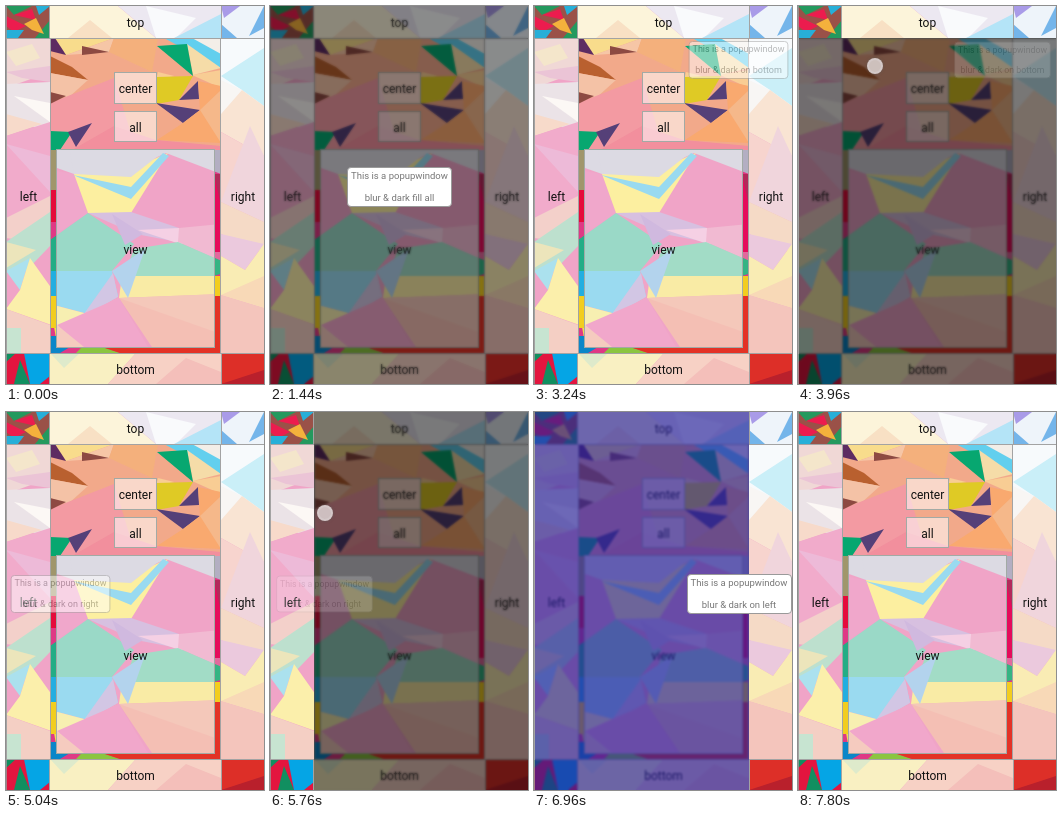
These frames come from a looping animation (258 by 378 pixels, 8 s). An HTML page:

```html
<!DOCTYPE html>
<html lang="en">
<head>
<meta charset="utf-8">
<title>Popup window demo</title>
<style>
  html, body { margin: 0; width: 100%; height: 100%; overflow: hidden; }
  #stage { position: relative; width: 258px; height: 378px; overflow: hidden; font-family: Roboto, sans-serif; }
  #stage > * { position: absolute; }
  svg { left: 0; top: 0; display: block; }
  .panel { box-sizing: border-box; border: 1px solid #a3a3a3; background: rgba(255,255,255,.54); padding-top: 2px;
    display: flex; align-items: center; justify-content: center; font-size: 12px; color: #111; }
  #center, #all, #view { border: 1.6px solid #a2aaa5; }
  #shade { backdrop-filter: blur(1px); }
  #popup { box-sizing: border-box; width: 105px; height: 40px; border: 1px solid #9a9a9a; border-radius: 4px;
    background: #fff; color: #777; font-size: 9.5px; line-height: 22px; text-align: center; white-space: nowrap;
    display: flex; flex-direction: column; justify-content: center; }
  #touch { box-sizing: border-box; width: 16px; height: 16px; margin: -8px; border-radius: 50%;
    background: rgba(235,230,230,.75); border: 2px solid rgba(215,205,205,.7); box-shadow: 0 0 3px rgba(90,90,90,.6); }
</style>
</head>
<body>
<div id="stage">
  <svg width="258" height="378" viewBox="0 0 258 378">
    <rect width="258" height="378" fill="#df3985"/>
    <!-- top edge -->
    <path fill="#9a5148" d="M0 0H44V32H0Z"/>
    <path fill="#24995e" d="M0 0H26L8 9ZM29 32 44 14V32Z"/>
    <path fill="#ec1c4e" d="M0 10 20 20 8 26 0 20ZM8 9 26 3 30 14Z"/>
    <path fill="#f4b13c" d="M18 18 30 12 38 28 26 24Z"/>
    <path fill="#27afd8" d="M0 24 18 24 12 32H0ZM30 0H44L33 9Z"/>
    <path fill="#f9e9b0" d="M44 0H112L150 32H44Z"/>
    <path fill="#f1bc7e" d="M62 32 84 14 106 32Z"/>
    <path fill="#d6cde1" d="M112 0H215V32H150Z"/>
    <path fill="#f2f4fa" d="M140 0 190 12 170 32H150Z"/>
    <path fill="#5cc4ef" d="M168 32 215 8V32Z"/>
    <path fill="#eef4fa" d="M215 0H258V110H215Z"/>
    <path fill="#a99be8" d="M215 0H234L218 12Z"/>
    <path fill="#74b5ea" d="M258 0V22L243 30ZM215 18 231 32H215Z"/>
    <!-- middle field -->
    <path fill="#f2a98a" d="M44 32H215V144H44Z"/>
    <path fill="#f8dc8c" d="M48 32H108L60 49Z"/>
    <path fill="#f6c6a6" d="M60 49 108 32 103 46Z"/>
    <path fill="#5d2c62" d="M44 32H49L60 49 44 45Z"/>
    <path fill="#f4b07c" d="M108 32H152L146 66 103 46Z"/>
    <path fill="#b9602f" d="M44 50 66 61 82 74 44 67Z"/>
    <path fill="#f4c2a6" d="M44 67 82 74 62 92 44 86Z"/>
    <path fill="#f39aa2" d="M44 97 108 72 130 144H44Z"/>
    <path fill="#8d4a42" d="M44 86 60 90 44 98ZM76 40 103 46 76 49Z"/>
    <path fill="#f8cd94" d="M152 66 168 70 150 74ZM186 69 215 64V82Z"/>
    <path fill="#62cfee" d="M158 32H215V62L184 46Z"/>
    <path fill="#f3eee8" d="M186 32H215V48Z"/>
    <path fill="#f5dca8" d="M181 38 215 62 187 69Z"/>
    <path fill="#07a770" d="M151 40 181 38 187 70ZM44 125 66 126 54 144H44Z"/>
    <path fill="#dfca25" d="M150 71 187 70 173 94 150 98Z"/>
    <path fill="#554078" d="M150 97 194 104 177 117ZM173 94 192 75 193 93ZM62 126 86 117 70 141Z"/>
    <path fill="#f9a96f" d="M215 80V137L151 134 177 117 194 104 192 75Z"/>
    <path fill="#f5b88a" d="M194 104 215 84V137Z"/>
    <path fill="#f28f9d" d="M66 144 108 120 150 134 215 140V144Z"/>
    <!-- left column -->
    <path fill="#dfaaa7" d="M0 32H44V66L0 82Z"/>
    <path fill="#e9c98e" d="M0 46 26 38 34 52 10 60Z"/>
    <path fill="#d47fa6" d="M0 66 44 60V76L16 72Z"/>
    <path fill="#d5c3cc" d="M0 78 44 76V126L0 112Z"/>
    <path fill="#faf0ea" d="M8 90 44 97V116Z"/>
    <path fill="#eeb08b" d="M0 108 36 118 0 130Z"/>
    <path fill="#e2498f" d="M0 130 44 116V200L0 212Z"/>
    <path fill="#d96aab" d="M0 138 44 150V186Z"/>
    <path fill="#e59a8c" d="M0 212 44 190V218L14 234 0 232Z"/>
    <path fill="#6fbd95" d="M0 236 44 206V240L20 265H0Z"/>
    <path fill="#d6c76b" d="M0 236 30 244 0 262Z"/>
    <path fill="#49bedb" d="M0 265 24 252 14 284Z"/>
    <path fill="#f8dc48" d="M14 284 24 252 51 290V321L0 303Z"/>
    <path fill="#e9977f" d="M0 303 44 319V348H0Z"/>
    <path fill="#86c59b" d="M0 322H15V348H0Z"/>
    <!-- view -->
    <path fill="#e03f8f" d="M51 165 68 168 82 207 51 228Z"/>
    <path fill="#b3aec2" d="M44 144H215V168L160 147 120 165 68 168 51 162Z"/>
    <path fill="#a0966b" d="M44 144H51V184H44Z"/>
    <path fill="#f9dc30" d="M68 168 120 165 162 147 125 207 82 207Z"/>
    <path fill="#b3aec2" d="M64 146H157L125 171 68 168Z"/>
    <path fill="#20b0df" d="M67 169 125 181 125 193ZM125 181 157 147 163 150 125 193Z"/>
    <path fill="#a977bd" d="M82 207 125 206 173 222 172 236 130 228Z"/>
    <path fill="#eb9ac4" d="M132 224 173 222 177 239Z"/>
    <path fill="#23ad85" d="M44 234 82 207 128 238 106 265H44Z"/>
    <path fill="#e2699d" d="M173 222 215 218V255L172 236Z"/>
    <path fill="#34b483" d="M128 243 172 236 232 262 208 270H118Z"/>
    <path fill="#9a66ba" d="M106 208 137 228 119 239Z"/>
    <path fill="#f2d43c" d="M116 270H215V290L113 292Z"/>
    <path fill="#e9745c" d="M113 292 215 288V347H150Z"/>
    <path fill="#e78769" d="M113 292 215 328V288Z"/>
    <path fill="#22aee0" d="M44 265H106L112 290 82 308 44 298Z"/>
    <path fill="#5aa0d8" d="M106 265 139 243 122 292Z"/>
    <path fill="#9d83c5" d="M75 312 107 267 112 291Z"/>
    <path fill="#efdc55" d="M44 298 82 308 113 292 66 318 51 338Z"/>
    <path fill="#e2408f" d="M51 319 113 292 142 341H74Z"/>
    <path fill="#ea8f75" d="M51 319 78 341H51Z"/>
    <!-- strips around the view -->
    <path fill="#e50b3b" d="M44 184H51V216H44Z"/>
    <path fill="#e50b5b" d="M208 168H215V246H208Z"/>
    <path fill="#b3295a" d="M208 168H215V200Z"/>
    <path fill="#f2cd1f" d="M44 290H51V322H44ZM208 270H215V290H208Z"/>
    <path fill="#0b86c8" d="M44 330H51V341H64L54 347H44Z"/>
    <path fill="#8bc540" d="M76 341H96L114 347H70Z"/>
    <path fill="#e33226" d="M96 341H208V290H215V347H114Z"/>
    <!-- right column -->
    <path fill="#8bdcf0" d="M215 70 258 42V100L236 84Z"/>
    <path fill="#f0ece8" d="M215 74 236 84 215 108Z"/>
    <path fill="#f2c4a0" d="M215 108 236 84 258 100V150L215 126Z"/>
    <path fill="#efa295" d="M215 126 258 150V216L215 196Z"/>
    <path fill="#dfa4b4" d="M215 196 244 120 258 150V216Z"/>
    <path fill="#eab083" d="M215 196 258 216V246L215 228Z"/>
    <path fill="#d48ab5" d="M215 228 258 238 239 264 215 250Z"/>
    <path fill="#f3d75c" d="M215 250 239 264 258 238V302L215 289Z"/>
    <path fill="#f0ad62" d="M215 289 258 270V302Z"/>
    <path fill="#e9806e" d="M215 289 258 302V348H215Z"/>
    <!-- bottom edge -->
    <path fill="#e3153f" d="M0 347H44V378H0Z"/>
    <path fill="#118f60" d="M14 354 24 378H8ZM0 347H10L0 356Z"/>
    <path fill="#05a5e5" d="M18 347H44V370L34 378H24Z"/>
    <path fill="#f3e07a" d="M44 347H130L102 378H44Z"/>
    <path fill="#b8d38f" d="M44 347H74L58 362Z"/>
    <path fill="#ee9c82" d="M130 347H215V378H102Z"/>
    <path fill="#e97368" d="M150 378 180 352 215 366V378Z"/>
    <path fill="#dd2f28" d="M215 347H258V378H215Z"/>
    <path fill="#b9202c" d="M215 378 258 364V378Z"/>
    <path fill="none" stroke="#999" stroke-opacity=".8" d="M.5 0V378M0 32.5H258M0 347.5H258"/>
  </svg>
</div>
<script>
const LOOP = 8000, STEP = 120;
const stage = document.getElementById('stage');

function add(id, className = '') {
  const el = document.createElement('div');
  el.id = id;
  el.className = className;
  return stage.appendChild(el);
}

function place(el, [left, top, right, bottom]) {
  Object.assign(el.style, {
    left: left + 'px', top: top + 'px',
    width: right - left + 'px', height: bottom - top + 'px'
  });
}

const panels = {
  top: [43, -1, 216, 33], left: [0, 32, 45, 348], right: [214, 32, 260, 348],
  bottom: [43, 347, 216, 379], center: [108, 66, 151, 98], all: [108, 105, 151, 136],
  view: [50, 143, 209, 342]
};
for (const [name, box] of Object.entries(panels)) {
  const el = add(name, 'panel');
  el.textContent = name;
  place(el, box);
}

const shade = add('shade'), popup = add('popup'), touch = add('touch');
const lines = [0, 1].map(() => popup.appendChild(document.createElement('div')));
lines[0].textContent = 'This is a popupwindow';

const black = 'rgba(0,0,0,.6)', blue = 'rgba(35,29,150,.66)';
const scenes = [
  { tap: 960, show: 1320, full: 1560, shut: 1920, end: 2280, where: 'fill all', tint: black,
    box: [0, 0, 258, 378], center: [129.5, 181], from: [129, 121], away: [66, 104] },
  { tap: 2880, show: 3240, full: 3480, shut: 3960, end: 4200, where: 'on bottom', tint: black,
    box: [1, 32, 258, 378], center: [204.5, 54], from: [105, 22], away: [77, 60] },
  { tap: 4560, show: 5040, full: 5400, shut: 5760, end: 6000, where: 'on right', tint: black,
    box: [44, 0, 258, 378], center: [54, 181.5], from: [28, 110.5], away: [55, 101] },
  { tap: 6360, show: 6720, full: 6960, shut: 7440, end: 7800, where: 'on left', tint: blue,
    box: [1, 0, 215, 378], center: [205, 181.5], from: [237, 112], away: [112, 92] }
];

function stateAt(scene, t) {
  const { show, full, shut, end } = scene;
  if (t < show || t >= end) return { dark: 0, alpha: 0, scale: 1 };
  if (t >= shut) {
    return { dark: .87 * (1 - (t - shut) / (end - shut)), alpha: t === shut ? .18 : 0, scale: .92 };
  }
  const rest = 1 - Math.min(1, (t - show) / (full - show));
  return { dark: 1 - rest * rest, alpha: t === show ? .5 : 1, scale: t === show ? .95 : 1 };
}

function render(time) {
  const t = Math.floor(time / STEP) * STEP;
  const scene = scenes.find(s => t < s.end) || scenes[0];
  const { dark, alpha, scale } = stateAt(scene, t);

  place(shade, scene.box);
  shade.style.background = scene.tint;
  shade.style.opacity = dark;

  const [x, y] = scene.center;
  lines[1].textContent = 'blur & dark ' + scene.where;
  Object.assign(popup.style, {
    left: x - 52.5 + 'px', top: y - 20 + 'px', opacity: alpha, transform: `scale(${scale})`
  });

  const pressed = start => t >= start && t < start + 2 * STEP;
  const [tx, ty] = t < scene.shut ? scene.from : scene.away;
  Object.assign(touch.style, {
    left: tx + 'px', top: ty + 'px', opacity: pressed(scene.tap) || pressed(scene.shut) ? 1 : 0
  });
}

const start = performance.now();
function tick() {
  render((performance.now() - start) % LOOP);
  requestAnimationFrame(tick);
}
tick();
</script>
</body>
</html>
```
